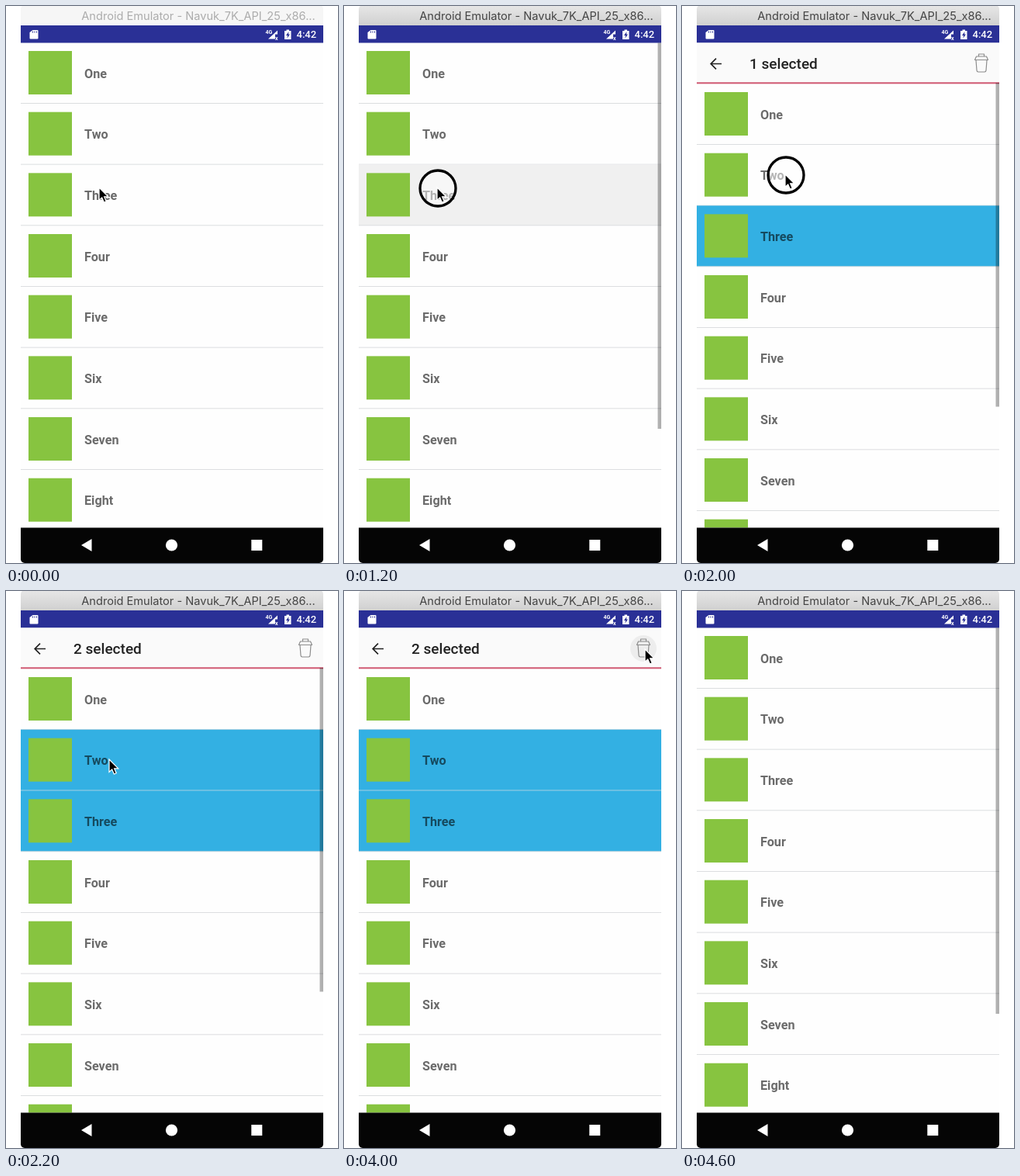
These frames come from a looping animation (428 px wide and 718 px high, 4.8 s). An HTML page:

```html
<!DOCTYPE html>
<html lang="en">
<head>
<meta charset="utf-8">
<title>List selection</title>
<style>
  html, body { margin: 0; width: 100%; height: 100%; overflow: hidden; background: #fff; }
  svg { display: block; width: 428px; height: 718px; }
  text { font-family: Roboto, "Noto Sans", sans-serif; }
  .title { font-family: Inter, "Open Sans", sans-serif; font-size: 14.6px; }
  .label { font-size: 16.2px; font-weight: 700; fill: #000; fill-opacity: .58; }
  .count { font-size: 19px; font-weight: 500; fill: #222; }
  .clock { font-size: 13px; font-weight: 500; fill: #fff; }
</style>
</head>
<body>
<svg viewBox="0 0 428 718">
  <defs>
    <linearGradient id="chrome" x2="0" y2="1">
      <stop stop-color="#e6e6e6"/><stop offset="1" stop-color="#d0d0d0"/>
    </linearGradient>
    <clipPath id="window"><rect x="19" y="-1" width="390" height="719" rx="5"/></clipPath>
    <clipPath id="screen"><rect x="19" y="47.5" width="390" height="625"/></clipPath>
  </defs>

  <g clip-path="url(#window)">
    <rect id="titleBar" x="19" width="390" height="25"/>
    <text id="titleText" class="title" x="97.3" y="18">Android Emulator - Navuk_7K_API_25_x86...</text>

    <rect x="19" y="25" width="390" height="23" fill="#2a3096"/>
    <g fill="#fff">
      <path d="M34.500 31h6q1 0 1 1v9.500q0 1-1 1h-9q-1 0-1-1v-7.500z"/>
      <path d="M350 31.500v5h-3v6h-9z"/>
      <path d="M361.500 30.500h3.500v1.500h2.500v11h-8.500v-11h2.500z"/>
      <text x="334.500" y="36" font-size="7" font-weight="700">4G</text>
      <text x="347" y="43.500" font-size="7" font-weight="700">x</text>
    </g>
    <path d="M34.500 32.500v2M37 32.500v2M39.500 32.500v2" stroke="#2a3096"/>
    <path d="M364.500 33l-3.500 5h2l-.5 3.500 3.500-5h-2z" fill="#2a3096"/>
    <text class="clock" x="374.500" y="41.200">4:42</text>

    <rect x="19" y="47.500" width="390" height="625.500" fill="#fefefe"/>
    <g clip-path="url(#screen)"><g id="list"></g></g>

    <g id="actionBar">
      <rect x="19" y="47.500" width="390" height="51.500" fill="#fafafa"/>
      <rect x="19" y="98.300" width="390" height="2" fill="#cf5871"/>
      <path d="M51 74.500H37.500M44 67.700l-6.800 6.800 6.800 6.800" fill="none" stroke="#222" stroke-width="1.700"/>
      <text id="count" class="count" x="87" y="81.200"></text>
      <circle id="trashRipple" cx="386" cy="74" r="17" fill="#000" fill-opacity=".05"/>
      <g fill="none" stroke="#8c8c8c" stroke-width="1.200" stroke-linejoin="round">
        <path d="M382.500 64.500v-2.500h7v2.500M379.500 65h13l2 4.500h-17z"/>
        <path d="M379 70l1 13q.2 2 2 2h8q1.800 0 2-2l1-13"/>
      </g>
    </g>
    <rect id="scrollbar" x="404.500" width="4.500" fill="#000" fill-opacity=".31"/>

    <rect x="19" y="672.500" width="390" height="46" fill="#050505"/>
    <g fill="#fff">
      <path d="M97 695l13.500-8v16z"/>
      <circle cx="213.500" cy="695" r="7.600"/>
      <rect x="316.300" y="688" width="14" height="14"/>
    </g>
  </g>

  <g id="cursor">
    <circle id="ring" cx="1" cy="1" r="23" fill="#fff" fill-opacity=".5" stroke="#000" stroke-width="3.300"/>
    <path d="M0 0V16.300L3.700 12.900 6.300 19 9.200 17.800 6.600 11.800H11.700Z" fill="#000" stroke="#fff" stroke-width="1.200"/>
  </g>
</svg>

<script>
const LOOP = 4800, TICK = 200, PITCH = 78.67;
const BLUE = '#33b0e3';
const $ = id => document.getElementById(id);
const set = (el, attrs) => { for (const k in attrs) el.setAttribute(k, attrs[k]); };
const show = (id, on) => set($(id), { visibility: on ? 'visible' : 'hidden' });
const within = (t, from, to) => t >= from && t < to;

function add(parent, tag, attrs) {
  const el = document.createElementNS('http://www.w3.org/2000/svg', tag);
  set(el, attrs);
  return parent.appendChild(el);
}

const rows = ['One', 'Two', 'Three', 'Four', 'Five', 'Six', 'Seven', 'Eight'].map((name, i) => {
  const top = 47 + i * PITCH;
  const back = add($('list'), 'rect', { x: 19, y: top, width: 390, height: PITCH });
  add($('list'), 'rect', { x: 29, y: top + 11, width: 56, height: 56, fill: '#87c440' });
  add($('list'), 'text', { class: 'label', x: 101, y: top + 45.7 }).textContent = name;
  add($('list'), 'rect', { x: 19, y: top + PITCH - .7, width: 390, height: 1, fill: '#dcdee0' });
  return back;
});

// time, x, y of the pointer tip
const path = [
  [0, 120, 234], [1600, 120, 234], [2000, 133, 217], [2400, 133, 217],
  [3200, 319, 648], [3400, 321, 632], [3800, 388, 75], [LOOP, 388, 75]
];

function pointerAt(t) {
  const i = path.findIndex(p => p[0] > t);
  const [t0, x0, y0] = path[i - 1], [t1, x1, y1] = path[i];
  const u = (t - t0) / (t1 - t0), e = u * u * (3 - 2 * u);
  return [x0 + (x1 - x0) * e, y0 + (y1 - y0) * e];
}

function scrollbarAlpha(t) {
  if (t < 400 || within(t, 3800, 4200)) return 0;
  return t === 3600 ? .5 : 1;
}

function render(time) {
  const t = Math.floor(time % LOOP / TICK) * TICK;
  const focused = t >= 200;
  const selecting = within(t, 1400, 4200);
  const selected = [within(t, 2200, 4200) && 1, selecting && 2];

  set($('titleBar'), { fill: focused ? 'url(#chrome)' : '#f6f6f6' });
  set($('titleText'), { fill: focused ? '#444' : '#acacac' });

  set($('list'), { transform: `translate(0 ${selecting ? 53 : 0})` });
  rows.forEach((row, i) => {
    const pressed = i === 2 && within(t, 1000, 1400);
    set(row, { fill: selected.includes(i) ? BLUE : pressed ? '#f0f0f0' : 'none' });
  });

  show('actionBar', selecting);
  set($('actionBar'), { opacity: t === 1400 ? .42 : 1 });
  $('count').textContent = `${t < 2200 ? 1 : 2} selected`;
  set($('trashRipple'), { opacity: within(t, 3800, 4200) ? 1 : 0 });

  set($('scrollbar'), {
    y: selecting ? 99 : 47.5,
    height: selecting ? 417.5 : 497.5,
    opacity: scrollbarAlpha(t)
  });

  const [x, y] = pointerAt(t);
  set($('cursor'), { transform: `translate(${x} ${y})`, opacity: t < 4400 ? 1 : 0 });
  set($('ring'), { opacity: within(t, 1000, 1600) || t === 2000 || t === 3800 ? 1 : 0 });
}

const start = performance.now();
function loop() {
  render(performance.now() - start);
  requestAnimationFrame(loop);
}
loop();
</script>
</body>
</html>
```
